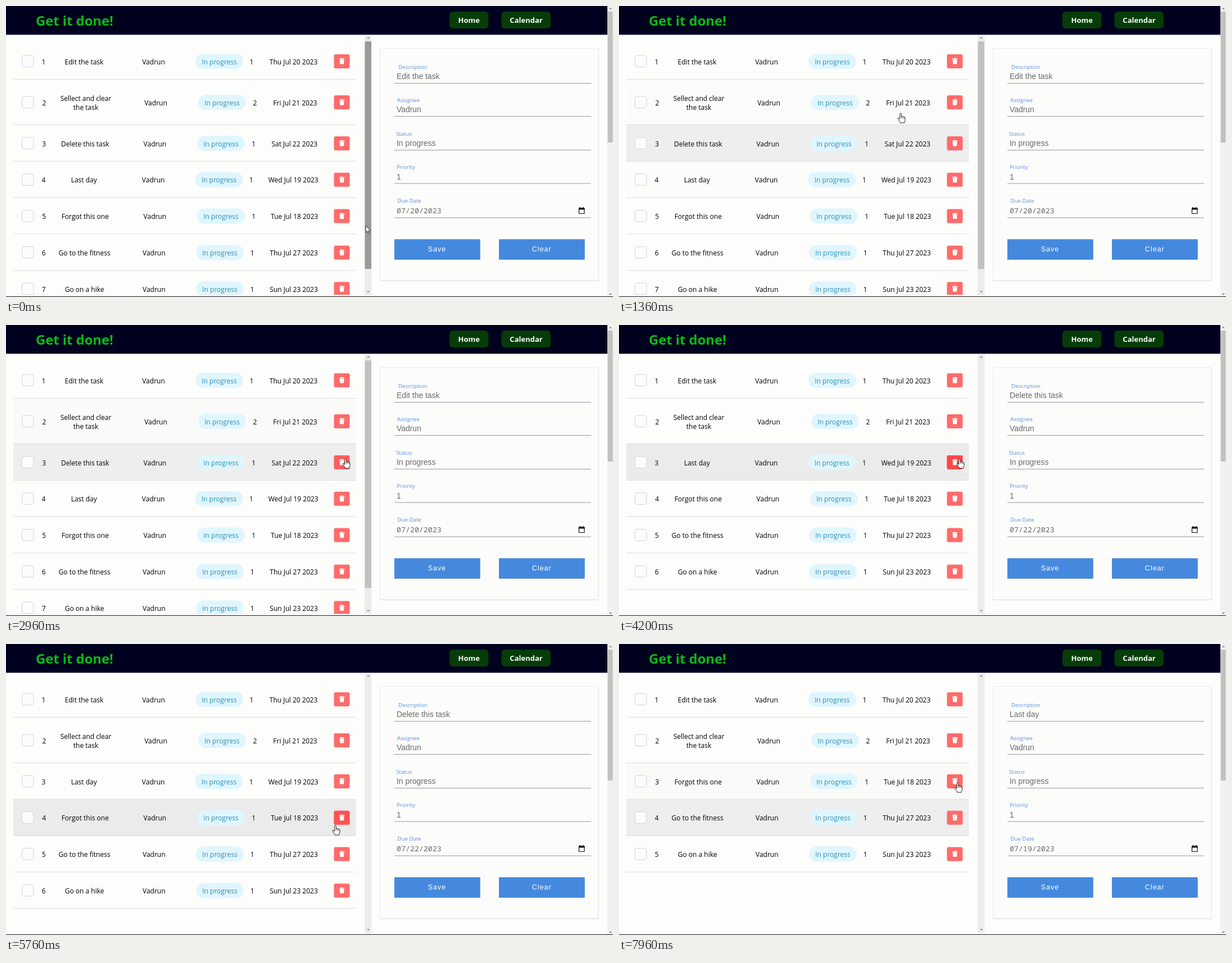
Recreate the animation shown at these times as an HTML page. Size 1080 by 518 pixels, loop 8000 ms.

```html
<!DOCTYPE html>
<html lang="en">
<head>
<meta charset="utf-8">
<title>Task list</title>
<style>
  html, body { margin: 0; width: 100%; height: 100%; overflow: hidden; background: #fdfdfc; }
  svg { display: block; width: 100vw; height: 100vh; font: 500 12px "Open Sans", "Noto Sans", sans-serif; }
  .mid { text-anchor: middle; }
  .nav { font-weight: 700; font-size: 13px; fill: #f4fff4; }
  .label { font-size: 9.7px; font-weight: 400; fill: #5b8fdc; }
  .value { font: 13.9px "Liberation Sans", Arial, sans-serif; fill: #6a6a6a; }
  .date { font: 13.3px "Noto Sans Mono", "DejaVu Sans Mono", monospace; fill: #6a6a6a; }
  .action { font: 12.5px "Liberation Sans", Arial, sans-serif; letter-spacing: 1px; fill: #fff; }
</style>
</head>
<body>
<svg id="stage" viewBox="0 0 1080 518" preserveAspectRatio="none">
  <defs><clipPath id="listClip"><rect y="52" width="638" height="462"/></clipPath></defs>
</svg>
<script>
const LOOP = 8000, FADE = 260;
const DELETIONS = [[3600, 2], [7120, 3]];
const ASSIGNEE = "Vadrun";

// text lines, priority, weekday and date, column shift
const tasks = [
  [["Edit the task"], 1, "Thu Jul 20", 0],
  [["Sellect and clear", "the task"], 2, "Fri Jul 21", 5],
  [["Delete this task"], 1, "Sat Jul 22", 3],
  [["Last day"], 1, "Wed Jul 19", -0.5],
  [["Forgot this one"], 1, "Tue Jul 18", 3],
  [["Go to the fitness"], 1, "Thu Jul 27", 1],
  [["Go on a hike"], 1, "Sun Jul 23", 1],
].map(([lines, priority, day, shift]) => ({ lines, priority, day, shift }));

// time, x, y of the pointer tip
const path = [
  [0, 640, 391], [80, 640, 391], [480, 590, 372], [880, 530, 318], [1120, 504, 277],
  [1320, 499, 214], [1360, 501, 191], [1640, 540, 172], [2040, 587, 169], [2440, 597, 171],
  [2700, 600, 205], [2900, 604, 238], [4200, 606, 238], [5000, 606, 240], [5250, 598, 270],
  [5400, 590, 318], [5760, 586, 323], [6200, 588, 318], [6500, 596, 250], [6840, 599, 243],
  [7120, 600, 244], [7400, 604, 290], [7880, 604, 288], [7960, 602.5, 247], [8000, 602.5, 247],
];

const stage = document.getElementById("stage");

function add(parent, tag, attrs = {}, text) {
  const node = document.createElementNS("http://www.w3.org/2000/svg", tag);
  for (const key in attrs) node.setAttribute(key, attrs[key]);
  if (text !== undefined) node.textContent = text;
  parent.append(node);
  return node;
}
const box = (parent, x, y, width, height, fill, more) =>
  add(parent, "rect", { x, y, width, height, fill, ...more });
const label = (parent, x, y, text, cls = "mid", more) =>
  add(parent, "text", { x, y, class: cls, ...more }, text);
const shape = (parent, d, fill, more) => add(parent, "path", { d, fill, ...more });
const show = (node, on) => node.setAttribute("display", on ? "inline" : "none");

const slotTop = i => i < 2 ? 66 + 65 * i : 212 + 64.8 * (i - 2);
const slotCenter = i => i < 2 ? 98.5 + 73 * i : 244.5 + 64.8 * (i - 2);

// Page and header
box(stage, 0, 0, 1080, 518, "#fdfdfc");
box(stage, 0, 51, 1070, 1.5, "#d5d5d8");
box(stage, 0, 0, 1070, 51, "#00001f");
label(stage, 53, 35, "Get it done!", "", { "font-size": 23.8, "font-weight": 700, fill: "#0abb14" });
box(stage, 789, 10, 69.5, 30, "#063c08", { rx: 6 });
box(stage, 881.5, 10, 87.5, 30, "#063c08", { rx: 6 });
label(stage, 823.7, 30, "Home", "mid nav");
label(stage, 925.5, 30, "Calendar", "mid nav");

// Task list
const list = add(stage, "g", { "clip-path": "url(#listClip)" });
const slots = tasks.map((_, i) => {
  const top = slotTop(i), height = slotTop(i + 1) - top, g = add(list, "g");
  return {
    g, top, height,
    tint: box(g, 13, top, 609.5, height, "#ebebeb"),
    line: box(g, 13, top + height - 1, 609.5, 1, "#dcdcdc"),
  };
});

function buildTask(task) {
  const g = add(list, "g"), s = task.shift;
  box(g, 28.5, -10.5, 20.5, 20.5, "#fcfcfd", { rx: 3.5, stroke: "#d2d1de" });
  const number = label(g, 67 + 0.2 * s, 5);
  const first = task.lines.length > 1 ? -3 : 5;
  task.lines.forEach((text, i) => label(g, 139 + 0.6 * s, first + 16.5 * i, text));
  label(g, 262.5 + 0.8 * s, 5, ASSIGNEE);
  box(g, 337 + s, -13.5, 85, 27, "#e0f6fe", { rx: 13.5 });
  label(g, 379.5 + s, 5, "In progress", "mid", { fill: "#2d8fb8" });
  label(g, 437 + 1.2 * s, 5, task.priority);
  label(g, 511.5 + 0.6 * s, 5, task.day + " 2023");
  box(g, 583.5, -12.5, 28, 25, "#ff6b6b", { rx: 3 });
  const hot = box(g, 583.5, -12.5, 28, 25, "#ff4747", { rx: 3 });
  shape(g, "M593 -5h3l.6 -1h2l.6 1h3v1.5h-9.2zM593.6 -3h8l-.6 7.2q-.1 .8 -.9 .8h-5q-.8 0 -.9 -.8z", "#fff");
  return { g, number, hot };
}
const rows = tasks.map(buildTask);

// Scrollbars
box(stage, 638, 52, 12.5, 462, "#ececec");
const thumb = box(stage, 638.5, 63, 11.5, 405, "#c1c1c1");
const arrows = [[644.5, 57, -1], [644.5, 508.5, 1], [1075.5, 4.5, -1], [1075.5, 513, 1]];
box(stage, 1070, 0, 10, 518, "#f1f1f1");
box(stage, 1070.5, 10, 9, 233, "#c1c1c1");
for (const [x, y, dir] of arrows)
  shape(stage, `M${x - 2.5} ${y - dir}h5l-2.5 ${2.6 * dir}z`, "#777");

// Form
box(stage, 665.5, 76.5, 389.5, 413.5, "#e6e6e4");
box(stage, 665.5, 75.5, 388.5, 413, "#fcfcfb", { stroke: "#ebebe6" });
const fields = [
  ["Description", 698, 111.5, 137.5], ["Assignee", 696, 171, 196.5], ["Status", 694, 230.5, 256.5],
  ["Priority", 695, 290, 316], ["Due Date", 696.5, 349.5, 377],
].map(([name, x, y, lineY], i) => {
  label(stage, x, y, name, "label");
  box(stage, 691, lineY - 0.5, 350, 1, "#9a9aa0");
  return label(stage, 695, i < 4 ? lineY - 7.5 : 368.5, "", i < 4 ? "value" : "date");
});
box(stage, 1019.5, 360, 9.5, 9.5, "none", { stroke: "#111", "stroke-width": 1.2, rx: 0.6 });
box(stage, 1019, 359.5, 10.5, 3, "#111");
box(stage, 1020.5, 358, 1.4, 2, "#111");
box(stage, 1026.5, 358, 1.4, 2, "#111");
[["Save", 691, 767], ["Clear", 877, 953.3]].forEach(([text, x, mid]) => {
  box(stage, x, 415.5, 152.5, 36, "#3d75c2");
  box(stage, x, 415.5, 152.5, 35, "#4589de");
  label(stage, mid, 437, text, "mid action");
});

box(stage, 0, 517, 1080, 1, "#15151a");

// Pointers, both with the tip at 0,0
const outline = { stroke: "#222", "stroke-width": 1, "stroke-linejoin": "round" };
const arrow = shape(stage, "M0 0v12.2l2.8 -2.6 1.9 4.3 2 -.9 -1.9 -4.1h3.8z", "#fff", outline);
const hand = add(stage, "g");
shape(hand, "M-1.4 1.3Q-1.4 0 0 0T1.3 1.3V6Q1.5 5 2.7 5.2T3.9 6.5Q4.2 5.6 5.3 5.9T6.3 7.2Q6.6 6.7 7.4 7T8 8.3" +
  "V12Q8 14 6.8 15.3V17H-1V15.5Q-2.6 14 -3.5 12L-5 9.6Q-5.2 8.2 -3.8 8.3L-1.4 10.4Z", "#fff", outline);
shape(hand, "M1.3 6v3M3.9 6.5v2.8M6.3 7.2v2.2", "none", { stroke: "#222", "stroke-width": 0.8 });

function pointerAt(t) {
  const next = Math.max(1, path.findIndex(key => key[0] > t));
  const [t0, x0, y0] = path[next - 1], [t1, x1, y1] = path[next];
  const k = (t - t0) / (t1 - t0);
  return { x: x0 + (x1 - x0) * k, y: y0 + (y1 - y0) * k };
}

// A linear hover transition equals the share of recent time spent inside.
function hoverLevel(t, inside) {
  const steps = 26;
  let hits = 0;
  for (let i = 0; i < steps; i++) {
    if (inside(pointerAt(Math.max(0, t - 10 - i * FADE / steps)))) hits++;
  }
  return hits / steps;
}

function draw(t) {
  const removed = DELETIONS.filter(([time]) => t >= time).map(([, index]) => index);
  const visible = tasks.map((_, i) => i).filter(i => !removed.includes(i));
  const pointer = pointerAt(t);

  slots.forEach(({ g, top, height, tint }, i) => {
    show(g, i < visible.length);
    tint.setAttribute("opacity", hoverLevel(t, p => p.x < 622 && p.y >= top && p.y < top + height));
  });
  rows.forEach(({ g, number, hot }, i) => {
    const slot = visible.indexOf(i);
    show(g, slot >= 0);
    if (slot < 0) return;
    const cy = slotCenter(slot);
    g.setAttribute("transform", `translate(0 ${cy})`);
    number.textContent = slot + 1;
    hot.setAttribute("opacity", hoverLevel(t, p => Math.abs(p.x - 597.5) < 14 && Math.abs(p.y - cy) < 12.5));
  });

  const chosen = tasks[removed.length ? removed[removed.length - 1] : 0];
  const values = [chosen.lines.join(" "), ASSIGNEE, "In progress", chosen.priority, `07/${chosen.day.slice(-2)}/2023`];
  fields.forEach((field, i) => { field.textContent = values[i]; });

  show(thumb, !removed.length);
  thumb.setAttribute("fill", pointer.x > 638 ? "#9a9a9a" : "#c1c1c1");

  const overList = pointer.x < 622;
  show(hand, overList);
  show(arrow, !overList);
  (overList ? hand : arrow).setAttribute("transform", `translate(${pointer.x} ${pointer.y})`);
}

const start = performance.now();
function tick() {
  draw((performance.now() - start) % LOOP);
  requestAnimationFrame(tick);
}
tick();
</script>
</body>
</html>
```
